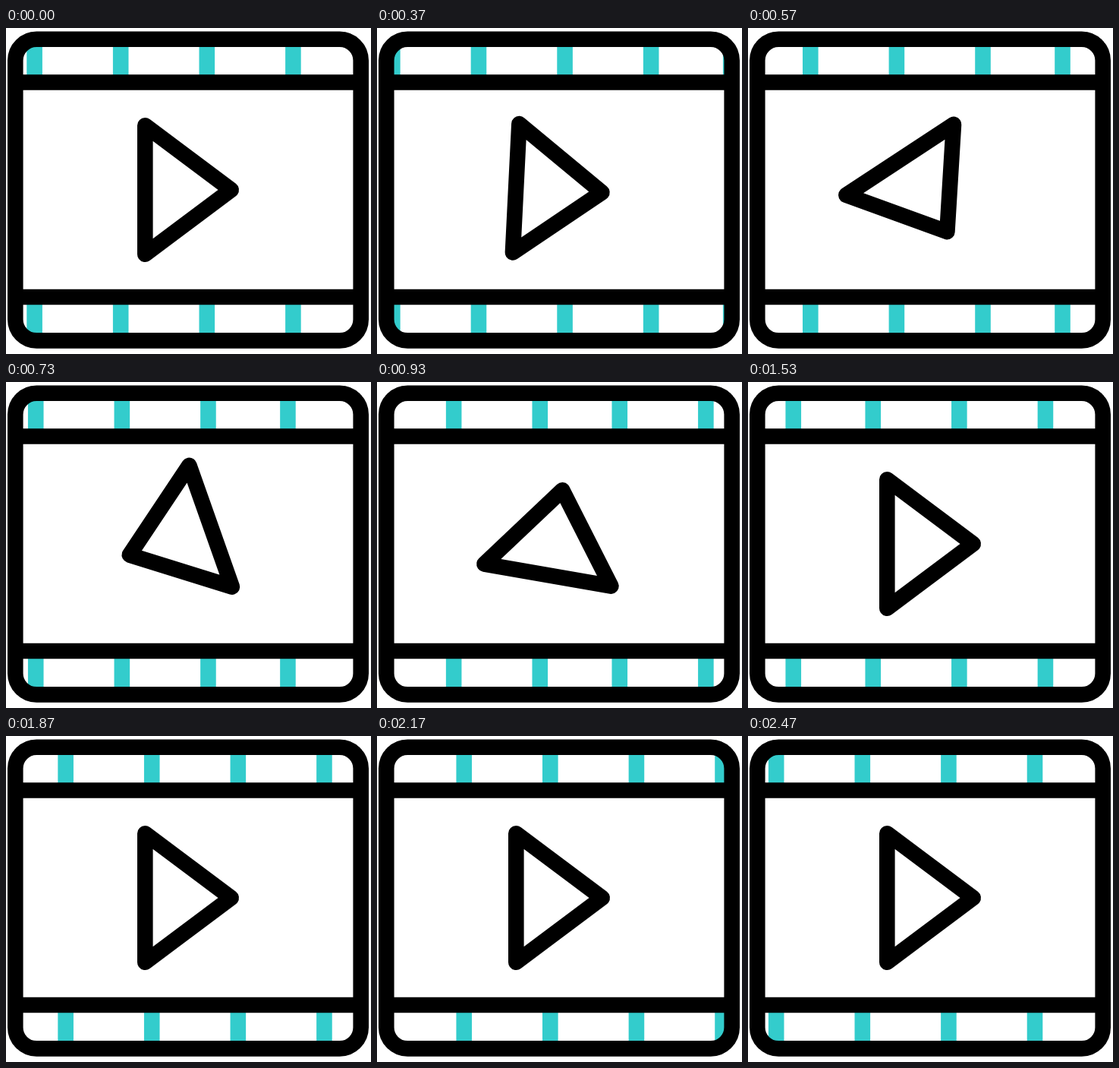
Animation, 481 px wide and 429 px high, one loop 2.5 s. Source, as an HTML page:

```html
<!DOCTYPE html>
<html lang="en">
<head>
<meta charset="utf-8">
<title>Film strip</title>
<style>
  html, body { margin: 0; width: 100%; height: 100%; overflow: hidden; background: #fff; }
  svg { display: block; width: 100%; height: 100%; }
</style>
</head>
<body>
<svg viewBox="0 0 481 429" fill="none" stroke-width="20.6" stroke-linejoin="round">
  <clipPath id="inside">
    <rect x="12.3" y="14.8" width="455.4" height="396.6" rx="28"/>
  </clipPath>
  <g clip-path="url(#inside)">
    <path id="stripes" stroke="#33cccc"/>
  </g>
  <g stroke="#000">
    <rect x="12.3" y="14.8" width="455.4" height="396.6" rx="28"/>
    <path d="M12.3 71.5H467.7M12.3 354H467.7"/>
    <path id="play" d="M183.3 128.3L296.7 213L183.3 297.8Z"/>
  </g>
</svg>
<script>
  const LOOP = 2500, FPS = 30, LAST = 74;
  const REST = 9;          // steps held before the motion starts
  const SPIN = 32;         // steps for one full turn
  const SPEED = 8.612;     // stripe travel per step
  const GAP = 113.6;

  const stripes = document.getElementById('stripes');
  const play = document.getElementById('play');

  // The belt closes up by one step at its seam, after the fourth stripe.
  let d = '';
  for (let i = 0; i < 10; i++) {
    const x = 37.6 + GAP * i - (i > 3 ? 8.6 : 0);
    d += `M${x} 14.8V71.5M${x} 354V411.4`;
  }
  stripes.setAttribute('d', d);

  const bezier = (a, b, u) =>
    3 * a * u * (1 - u) ** 2 + 3 * b * u * u * (1 - u) + u ** 3;

  function ease(t) {
    if (t >= 1) return 1;
    let lo = 0, hi = 1;
    for (let i = 0; i < 30; i++) {
      const mid = (lo + hi) / 2;
      if (bezier(0.42, 0.4, mid) < t) lo = mid; else hi = mid;
    }
    return bezier(0, 1, lo);
  }

  function draw(ms) {
    const tick = Math.min(LAST, Math.floor((ms % LOOP + 5) * FPS / 1000));
    const step = Math.max(0, tick - REST);
    stripes.setAttribute('transform', `translate(${-SPEED * step} 0)`);
    play.setAttribute('transform', `rotate(${360 * ease(step / SPIN)} 228.5 208.8)`);
  }

  const start = performance.now();
  function loop() {
    draw(performance.now() - start);
    requestAnimationFrame(loop);
  }
  loop();
</script>
</body>
</html>
```
